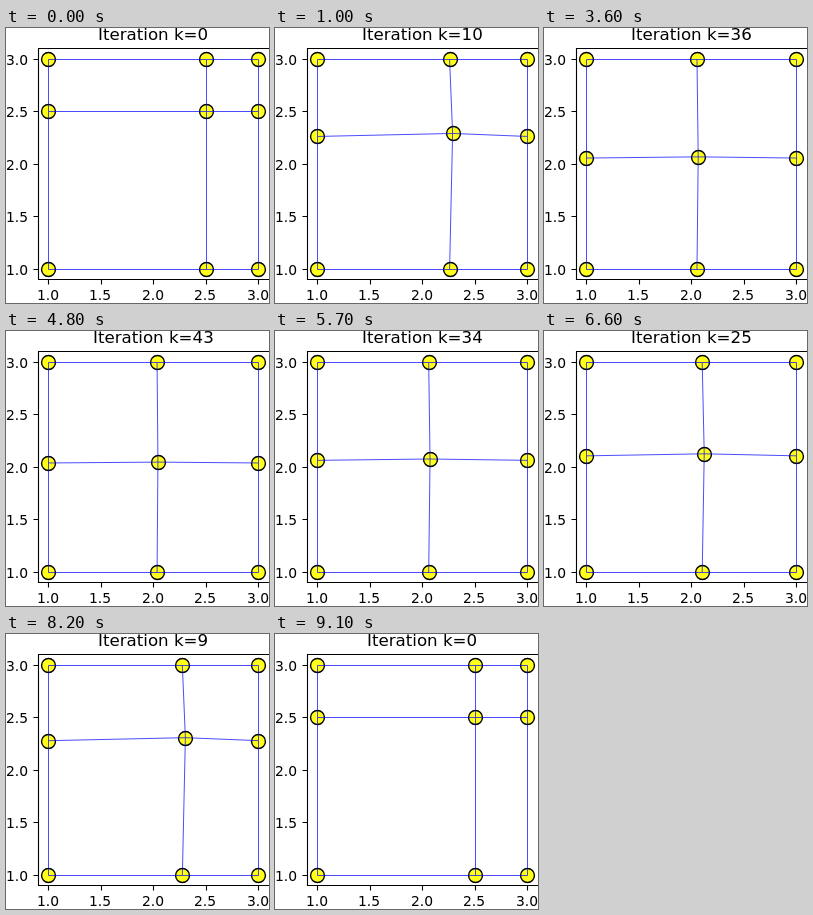
Recreate the animation shown at these times as an HTML page. Size 263x275 px, loop 9.2 s.

```html
<!DOCTYPE html>
<html lang="en">
<head>
<meta charset="utf-8">
<title>Grid relaxation</title>
<style>
  html, body { margin: 0; width: 100%; height: 100%; overflow: hidden; background: #fff; }
  svg { display: block; width: 263px; height: 275px; font: 13.89px "DejaVu Sans", sans-serif; }
  #title { font-size: 16.67px; }
  #axes { fill: none; stroke: #000; stroke-width: 1.11; }
  #nodes { fill: #ffff1a; stroke: #000; stroke-width: 1.39; }
  #mesh { fill: none; stroke: #00f; stroke-width: .7; }
</style>
</head>
<body>
<svg viewBox="0 0 263 275">
  <g id="axes"></g>
  <g id="labels"></g>
  <g id="nodes"></g>
  <g id="mesh"></g>
  <text id="title" y="12"></text>
</svg>
<script>
const STEP = 100, STEPS = 92, LAST = 45;
const $ = id => document.getElementById(id);
const px = x => 42.25 + (x - 1) * 105;
const py = y => 240.8 - (y - 1) * 105;
const snap = v => Math.round(v) + 0.5;

function add(parent, tag, attrs, text = '') {
  const el = document.createElementNS('http://www.w3.org/2000/svg', tag);
  for (const key in attrs) el.setAttribute(key, attrs[key]);
  el.textContent = text;
  return $(parent).appendChild(el);
}

// Start text on a whole pixel; share is the part of its width left of x
function place(text, x, share) {
  text.setAttribute('x', Math.floor(x - text.getComputedTextLength() * share));
}

add('axes', 'path', { d: 'M264 20.5H32.5V251.5H264' });
for (let v = 1; v <= 3; v += 0.5) {
  const x = snap(px(v)), y = snap(py(v)), label = v.toFixed(1);
  add('axes', 'path', { d: `M${x} 251.5v5M32.5 ${y}h-5` });
  place(add('labels', 'text', { y: 272 }, label), px(v), 0.5);
  place(add('labels', 'text', { y: y + 5.5 }, label), 22.5, 1);
}

const nodes = Array.from({ length: 9 }, () => add('nodes', 'circle', { r: 6.94 }));
const lines = Array.from({ length: 6 }, () => add('mesh', 'polyline', {}));

// Offsets from the middle for the sliding edge nodes and the centre node
const edgeShift = k => 0.418 * Math.exp(-0.057 * k) + 0.082 * Math.exp(-0.123 * k);
const centreShift = k => 0.51 * Math.exp(-0.0567 * k) - 0.01 * Math.exp(-0.4 * k);

function draw(k) {
  const edge = 2 + edgeShift(k), centre = 2 + centreShift(k);
  const coord = (main, cross) => main !== 1 ? 1 + main : cross === 1 ? centre : edge;
  const points = nodes.map((node, n) => {
    const i = n % 3, j = Math.floor(n / 3);
    const x = px(coord(i, j)), y = py(coord(j, i));
    node.setAttribute('cx', snap(x));
    node.setAttribute('cy', snap(y));
    // Straight lines sit on whole pixels
    return [i !== 1 || k === 0 ? snap(x) : x, j !== 1 || k === 0 ? snap(y) : y];
  });
  for (let a = 0; a < 3; a++) {
    lines[a].setAttribute('points', [0, 1, 2].map(b => points[a * 3 + b]).join(' '));
    lines[a + 3].setAttribute('points', [0, 1, 2].map(b => points[b * 3 + a]).join(' '));
  }
  $('title').textContent = 'Iteration k=' + k;
  place($('title'), 147.75, 0.5);
}

let shown = -1;
const start = performance.now();
function tick() {
  const n = Math.floor((performance.now() - start) / STEP) % STEPS;
  const k = n <= LAST ? n : STEPS - 1 - n;
  if (k !== shown) draw(shown = k);
  requestAnimationFrame(tick);
}
tick();
</script>
</body>
</html>
```
